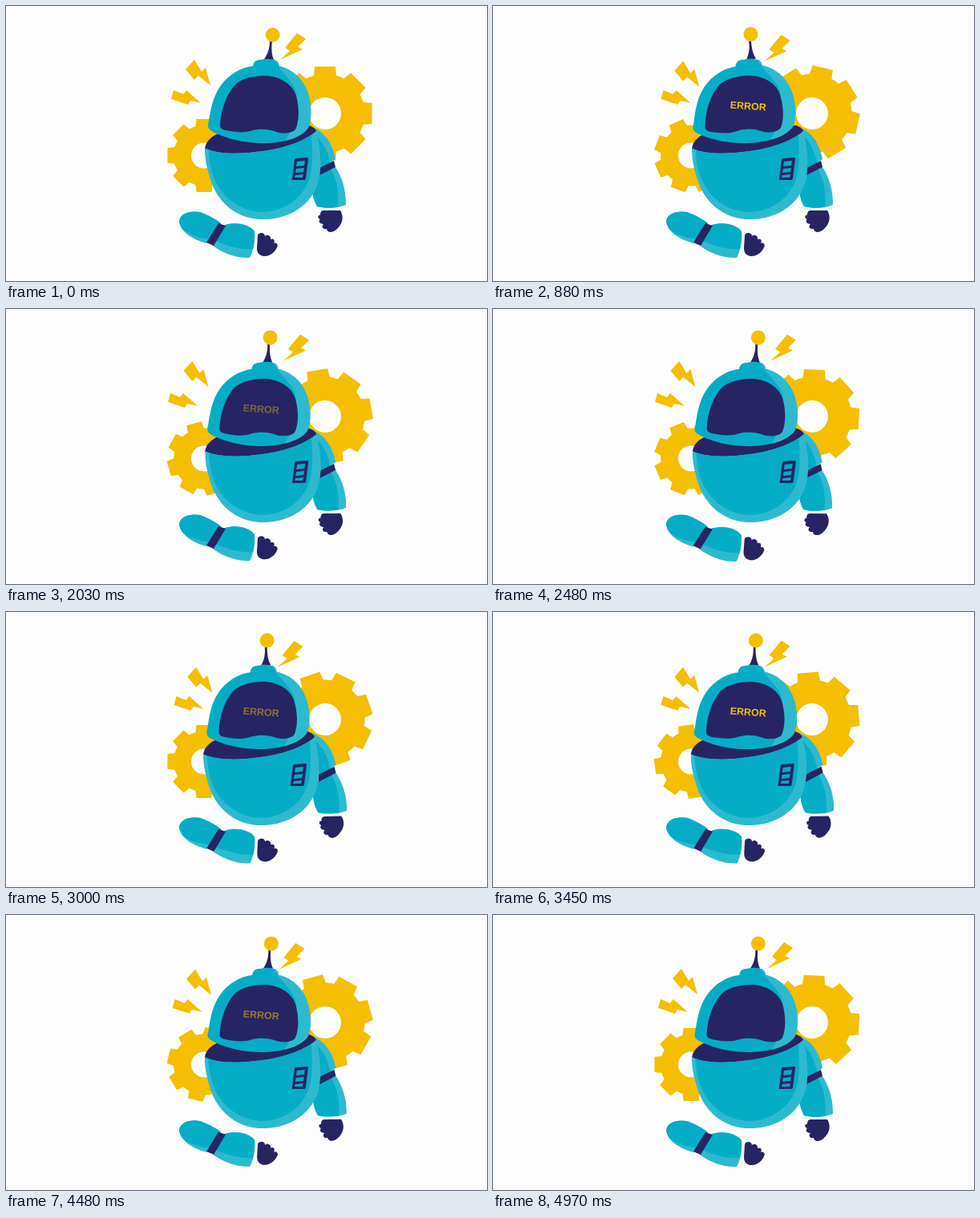
These frames come from a looping animation (600 px wide and 343 px high, 5 s). An HTML page:

```html
<!DOCTYPE html>
<html lang="en">
<head>
<meta charset="utf-8">
<title>Broken robot</title>
<style>
  html, body { margin: 0; width: 100%; height: 100%; overflow: hidden; background: #fefdfe; }
  svg { display: block; width: 100%; height: 100%; }
  .yellow { fill: #f5be00; }
  .teal { fill: #04adc5; }
  .light { fill: #2dbacf; }
  .navy { fill: #272463; }
  .paper { fill: #fefdfe; }
  text { font: bold 12.5px "Liberation Sans", Arial, sans-serif; fill: #f5be00; }
</style>
</head>
<body>
<svg viewBox="0 0 600 343">
  <defs>
    <clipPath id="headClip"><path d="M252 148C255 135 256 112 272 94C284 81 298 76 308 75C309 69 312 67 318 67C325 65 332 66 337 68C340 70 341 73 341 75C364 81 378 100 380 125C381 135 380 145 377 152C366 168 335 172 315 171C290 170 268 163 255 155Q251 152 252 148Z"/></clipPath>
    <clipPath id="bodyClip"><path d="M248 177C262 185 292 185 320 181C350 177 375 167 387 156C392 175 394 195 391 213C386 243 360 264 325 266C288 268 262 244 254 213C250 200 248 190 248 177Z"/></clipPath>
    <clipPath id="foreClip"><path d="M389 211L411 201C420 215 424 230 424 248C416 252 398 253 388 250C384 243 382 235 382 225Z"/></clipPath>
    <clipPath id="leftClip"><path d="M216 268C218 258 230 255 242 257C253 261 262 266 268 271L250 296C236 292 218 284 216 268ZM273 273C290 268 305 274 310 281C311 293 308 308 304 314C288 315 270 308 258 299Z"/></clipPath>
  </defs>

  <g id="bigGear"><path class="yellow"/><circle class="paper" r="20"/></g>
  <g id="smallGear"><path class="yellow"/><circle class="paper" r="16"/></g>

  <g class="yellow">
    <path id="boltRight" d="M363 34L374 41L364 51L370 54L342 67L354 56L348 52Z"/>
    <path id="boltTop" d="M235 67L224 79L235 92L240 87L255 99L249 77L244 82Z"/>
    <path id="boltLow" d="M209 105L221 110L225 105L243 121L230 118L227 123L206 116Z"/>
  </g>

  <g id="rightArm">
    <path class="light" d="M376 149C396 154 407 170 411 191L391 204L380 200Z"/>
    <path class="teal" d="M378 155C393 164 401 178 404 196L384 208Z"/>
    <g clip-path="url(#foreClip)">
      <path class="light" d="M375 195H430V255H375Z"/>
      <path class="teal" d="M375 200L405 203C413 217 416 233 414 255H375Z"/>
    </g>
    <path class="navy" d="M389 203L409 193L411 201L389 212Z"/>
    <path class="navy" d="M396 255H417C422 263 420 272 412 279C406 284 400 282 400 278C395 279 393 275 396 272C391 272 389 268 392 266C388 265 389 260 392 261C392 258 393 255 396 255Z"/>
  </g>

  <g id="leftArm">
    <g clip-path="url(#leftClip)">
      <path class="light" d="M210 250H315V320H210Z"/>
      <path class="teal" d="M210 268C220 283 238 290 254 290C272 298 290 305 315 303V250H210Z"/>
    </g>
    <path class="navy" d="M265 271L274 274L259 299L250 295Z"/>
    <path class="navy" d="M314 286C315 282 323 282 323 287C326 284 331 287 330 291C334 289 336 293 334 296C338 294 340 299 338 301C336 307 328 313 321 312C316 311 313 308 313 302Z"/>
  </g>

  <g id="body">
    <path class="navy" d="M248 178C249 168 258 160 272 157L378 149C384 151 387 154 387 157C375 169 350 178 320 182C292 185 262 186 248 178Z"/>
    <g clip-path="url(#bodyClip)">
      <path class="light" d="M240 150H400V270H240Z"/>
      <path class="teal" d="M252 150C252 190 255 207 262 220C273 242 294 256 320 257C350 256 374 237 380 209C383 192 382 176 380 150Z"/>
    </g>
    <path class="navy" d="M362 190L376 189Q377 189 377 191L374 215Q374 217 372 217L358 217Q356 217 357 215L360 192Q360 190 362 190Z"/>
    <path class="teal" d="M363 194L373 193L372 199L362 200ZM362 203L372 202L371 207L361 208ZM361 211L371 210L370 214L360 214Z"/>
  </g>

  <g id="head">
    <g id="antenna">
      <path class="navy" d="M329 43C329 54 326 61 321 68L334 67C331 60 331 52 332 43Z"/>
      <circle class="yellow" cx="332.7" cy="36" r="9"/>
    </g>
    <g clip-path="url(#headClip)">
      <path class="teal" d="M245 60H385V175H245Z"/>
      <path class="light" d="M333 60C337 78 352 86 361 104C367 128 359 155 343 175H390V60Z"/>
    </g>
    <path class="navy" d="M267 149C268 128 276 108 287 97C297 89 311 87 324 87C344 88 358 99 362 112C366 127 366 144 361 154C357 159 345 160 337 157C328 153 316 153 308 155C300 158 290 158 280 156C271 155 267 153 267 149Z"/>
  </g>
  <text id="label" transform="translate(295.500 127.500) rotate(4)">ERROR</text>
</svg>
<script>
const LOOP = 5000;
const beats = [0, 880, 1520, 2480, 3000, 4000, 4970];
const tracks = {
  bigTurn: [0, 13, 21, 48, 71, 102, 137.5],
  smallTurn: [0, -24, -53, -68, -90, -108, -135],
  sway: [0, -12, -5, -2, -7.5, -2, -2],
  bolt: [0, -3.5, 4, 4, -3.5, -3.2, 0],
  bodyShift: [0, 0, -.5, .8, -2, -.3, 0],
  armSwing: [0, 0, -1.1, .5, -.8, -1.2, 0],
  leftSwing: [0, 0, -.6, .7, -.4, -.4, 0]
};

const $ = id => document.getElementById(id);
const place = (id, transform) => $(id).setAttribute("transform", transform);
const clamp = v => Math.min(1, Math.max(0, v));
const smooth = u => u * u * (3 - 2 * u);
const linear = u => u;

function sample(values, t, ease = smooth) {
  let i = 0;
  while (i < beats.length - 2 && t >= beats[i + 1]) i++;
  const u = clamp((t - beats[i]) / (beats[i + 1] - beats[i]));
  return values[i] + (values[i + 1] - values[i]) * ease(u);
}

// Eight straight-sided teeth joined by arcs along the root circle.
function gearPath(outer, root, halfTip, halfBase) {
  const points = [];
  for (let k = 0; k < 8; k++) {
    const a = k * Math.PI / 4;
    const spin = (x, y) =>
      `${(x * Math.cos(a) - y * Math.sin(a)).toFixed(2)} ${(x * Math.sin(a) + y * Math.cos(a)).toFixed(2)}`;
    const join = k ? `A${root} ${root} 0 0 1 ` : "M";
    points.push(join + spin(-halfBase, -root), "L" + spin(-halfTip, -outer),
      "L" + spin(halfTip, -outer), "L" + spin(halfBase, -root));
  }
  return points.join("") + "Z";
}

function draw(time) {
  const t = time % LOOP;
  const sway = sample(tracks.sway, t);
  const bolt = sample(tracks.bolt, t);

  place("bigGear", `translate(398 134) rotate(${sample(tracks.bigTurn, t, linear)})`);
  place("smallGear", `translate(247 186.500) rotate(${sample(tracks.smallTurn, t, linear)})`);
  place("boltRight", `translate(${bolt} ${-bolt * .55})`);
  place("boltTop", `translate(${-bolt * .65} ${-bolt * .5})`);
  place("boltLow", `translate(${-bolt} 0)`);
  place("rightArm", `rotate(${sample(tracks.armSwing, t)} 388 158)`);
  place("leftArm", `rotate(${sample(tracks.leftSwing, t)} 222 265)`);
  place("body", `translate(${sample(tracks.bodyShift, t)} 0)`);
  place("head", `translate(${sway * .13} 0) rotate(${sway * .2} 318 170)`);
  place("antenna", `rotate(${sway * .6} 327 68)`);

  const blink = t % (LOOP / 2);
  const glow = smooth(clamp((blink - 200) / 600)) * (1 - smooth(clamp((blink - 1700) / 600)));
  $("label").setAttribute("opacity", glow);
}

$("bigGear").firstChild.setAttribute("d", gearPath(58.5, 47.5, 13, 14));
$("smallGear").firstChild.setAttribute("d", gearPath(45.5, 36.5, 9.5, 10.5));

const start = performance.now();
function tick() {
  draw(performance.now() - start);
  requestAnimationFrame(tick);
}
draw(0);
requestAnimationFrame(tick);
</script>
</body>
</html>
```
